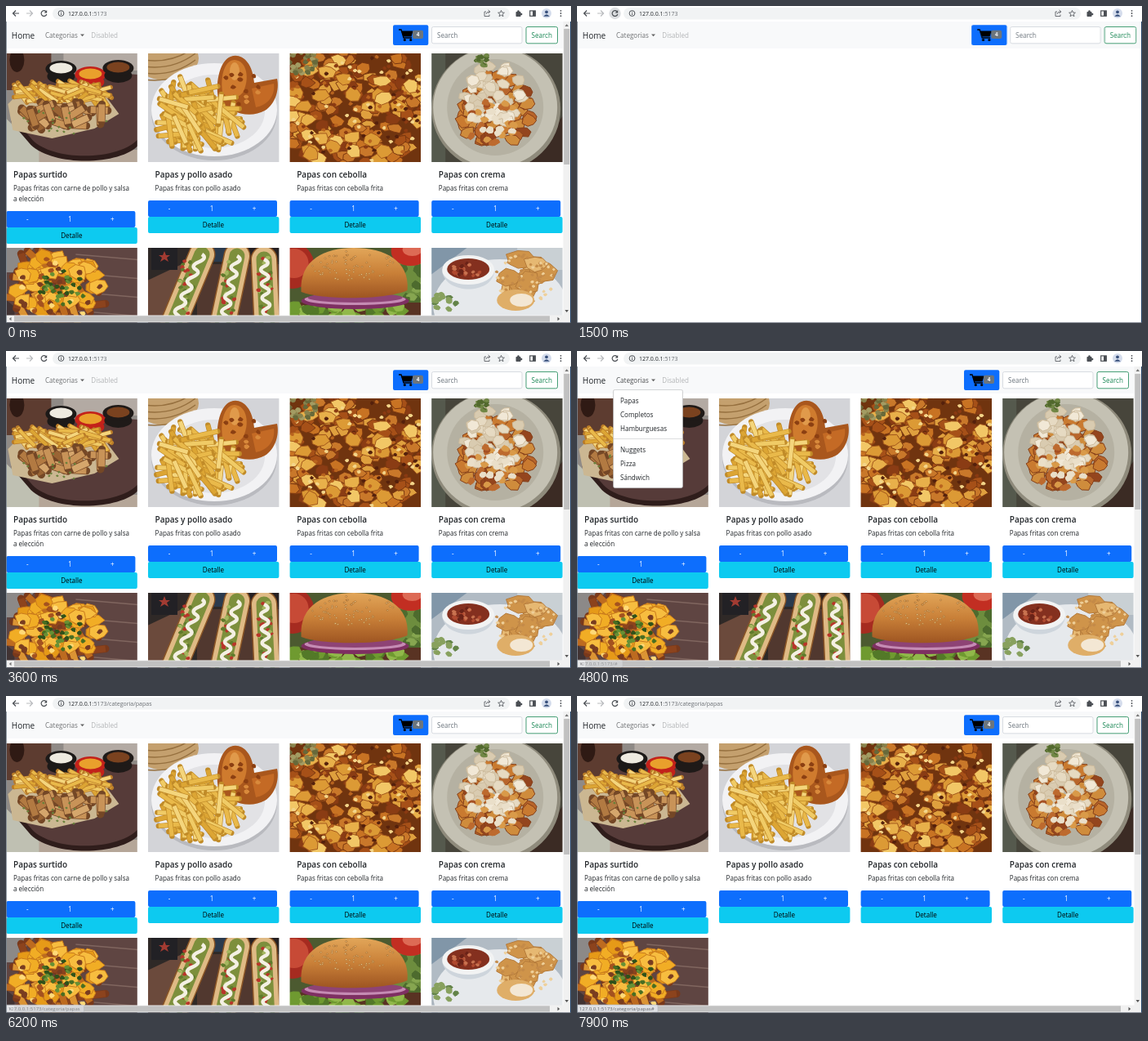
Animation, 692 px wide and 388 px high, one loop 8 s. Source, as an HTML page:

```html
<!DOCTYPE html>
<html lang="es">
<head>
<meta charset="utf-8">
<title>Papas</title>
<style>
  html, body { margin: 0; width: 100%; height: 100%; overflow: hidden; background: #fff; }
  svg { display: block; }
  text { font: 8.05px "Open Sans", "Noto Sans", sans-serif; fill: #212529; white-space: pre; }
  .title { font-size: 10px; font-weight: 600; }
  .brand { font-size: 10px; }
  .url { font-size: 7px; }
  .status { font-size: 6px; fill: #5f6368; }
  .mid { text-anchor: middle; }
  .white { fill: #fff; }
  .black { fill: #000; }
</style>
</head>
<body>
<script>
const LOOP = 8000;

// Drawing helpers
const rect = (x, y, w, h, fill, extra = '') =>
  `<rect x="${x}" y="${y}" width="${w}" height="${h}" fill="${fill}" ${extra}/>`;
const oval = (x, y, rx, ry, fill, extra = '') =>
  `<ellipse cx="${x}" cy="${y}" rx="${rx}" ry="${ry}" fill="${fill}" ${extra}/>`;
const path = (d, fill, extra = '') => `<path d="${d}" fill="${fill}" ${extra}/>`;
const line = (d, color, w = 1, extra = '') =>
  path(d, 'none', `stroke="${color}" stroke-width="${w}" ${extra}`);
const text = (x, y, str, cls = '', extra = '') =>
  `<text x="${x}" y="${y}" class="${cls}" ${extra}>${str}</text>`;
const group = (id, ...parts) => `<g id="${id}">${parts.join('')}</g>`;

const random = seed => () => (seed = seed * 16807 % 2147483647) / 2147483647;

// Spread n small shapes over an ellipse
function scatter(seed, n, [cx, cy, rx, ry], colors, shape) {
  const r = random(seed * 7919);
  let out = '';
  for (let i = 0; i < n; i++) {
    const a = r() * 6.283, d = Math.sqrt(r());
    const x = cx + Math.cos(a) * d * rx, y = cy + Math.sin(a) * d * ry;
    out += shape(x, y, colors[Math.floor(r() * colors.length)], r);
  }
  return out;
}
// Sticks lie within `spread` radians of the angle `turn`
const stick = (len, w, edge, turn = 0, spread = 3.14) => (x, y, color, r) => {
  const a = turn + (r() - 0.5) * spread, dx = Math.cos(a) * len / 2, dy = Math.sin(a) * len / 2;
  const d = `M${x - dx} ${y - dy}L${x + dx} ${y + dy}`;
  return line(d, edge, w + 1.4, 'stroke-linecap="round"') + line(d, color, w);
};
const lump = (size, edge) => (x, y, color, r) => {
  const pts = [];
  for (let i = 0; i < 7; i++) {
    const a = i * 0.898, d = size * (0.65 + r() * 0.5);
    pts.push(`${x + Math.cos(a) * d} ${y + Math.sin(a) * d * 0.8}`);
  }
  return path(`M${pts.join('L')}Z`, color,
    `stroke-linejoin="round" stroke="${edge || color}" stroke-width="1"`);
};

const fries = ['#e9b94a', '#f0cb66', '#dca534', '#f4d57c'];
const backdrop = color => rect(-5, -5, 171, 143, color);

const foods = [
  // Mixed platter
  () => backdrop('#8f8a86') + rect(-5, -5, 60, 50, '#5d3c30') + rect(70, -5, 95, 26, '#b3aaa3') +
    oval(13, 8, 9, 15, '#2f1a14') + path('M-5 75L60 140H-5Z', '#bfc0b2') +
    path('M40 118L166 118V140H40Z', '#b5a698') +
    path('M6 84C10 30 70 22 162 28V112C142 136 60 140 30 112Z', '#2f1d1b') +
    path('M8 78C12 28 70 20 162 26V104C142 130 60 134 32 106Z', '#563b39') +
    [[67, 19, '#eeeae0', '#1c1918'], [103, 26, '#e9a02c', '#c3211a'], [137, 18, '#7a421f', '#1f1a18']]
      .map(([x, y, sauce, cup]) => oval(x, y + 9, 17, 9, cup) + oval(x, y, 19, 10, cup) +
        oval(x, y - 1, 14, 6.5, sauce)).join('') +
    path('M2 62L20 44L120 50L138 74L108 92L56 104L8 94Z', '#cbb792') +
    scatter(3, 64, [70, 49, 56, 10], fries, stick(27, 4, '#b97b28', .15, 1.7)) +
    scatter(8, 30, [72, 76, 48, 14], ['#b27a42', '#c89358', '#9a6434', '#d5a66c'], stick(21, 8, '#744726', .5, 2.2)) +
    scatter(4, 20, [70, 82, 55, 18], ['#68823b'], lump(1.3)),

  // Chips and roast chicken
  () => backdrop('#d3d4d8') + oval(22, 6, 40, 27, '#c4a06e') +
    [8, 16, 24, 32].map(y => line(`M-5 ${y}Q30 ${y + 5} 58 ${y - 16}`, '#96703f', 1.5)).join('') +
    oval(81, 73, 77, 58, '#b9babf') + oval(81, 69, 77, 57, '#f2f2f4') + oval(81, 71, 62, 45, '#e2e2e5') +
    path('M86 54C82 34 89 8 101 4C113 -1 128 9 130 36L158 31C161 44 156 62 143 70C125 80 99 74 86 54Z', '#a9571d') +
    path('M91 47C88 25 95 8 106 8C121 9 125 31 116 48C108 57 97 57 91 47Z', '#cf7b2e') +
    path('M127 43L154 37C156 50 148 63 132 66Z', '#c46a25') + oval(106, 22, 6, 11, '#e09a4b') +
    scatter(22, 14, [114, 45, 26, 22], ['#8b3f12', '#d98a3c'], lump(3)) +
    scatter(11, 90, [60, 76, 46, 33], fries, stick(36, 5, '#c18b28', .8, 2.1)),

  // Potatoes with onion
  () => backdrop('#70340f') +
    scatter(5, 150, [80, 68, 95, 78], ['#c9782a', '#a65018', '#dfa03e', '#8a3c14', '#c87323'], lump(9, '#7a3710')) +
    scatter(9, 36, [80, 70, 86, 68], ['#e8b04a', '#f2c766', '#dc9a35'], lump(11, '#a3571b')) +
    scatter(14, 110, [80, 68, 90, 74], ['#54200c', '#8a3a12', '#f4d68a', '#b9641f'], lump(2.4)) +
    scatter(6, 50, [12, 6, 26, 19], ['#87824d', '#a39c63', '#67693a'], lump(3.6)),

  // Potatoes with cream
  () => backdrop('#47453b') + rect(-5, -5, 22, 143, '#55594d') + path('M166 70V140H112Z', '#3b2b24') +
    oval(79, 68, 79, 76, '#8f8b7c') + oval(78, 66, 76, 73, '#c4c1b3') + oval(78, 66, 59, 59, '#b5b1a2') +
    scatter(2, 70, [79, 70, 44, 44], ['#b8652b', '#cf8c3c', '#94451e', '#c97a30'], lump(10, '#853f19')) +
    scatter(7, 48, [76, 52, 37, 40], ['#e6dac2', '#f1e8d6', '#d9cbb0'], lump(8, '#cdbb9c')) +
    scatter(10, 24, [78, 86, 42, 30], ['#bd6a2e', '#d99a49', '#a54f22'], lump(5)) +
    scatter(19, 12, [76, 84, 30, 18], ['#eadfc9'], lump(5)) +
    scatter(3, 14, [62, 8, 10, 7], ['#52692d', '#718745'], lump(3)),

  // Loaded fries
  () => backdrop('#5f4542') +
    [8, 31, 54, 77].map(y => line(`M85 ${y}L166 ${y + 7}`, '#80665f', 1.4)).join('') +
    path('M-5 -5H38L8 30H-5Z', '#8c8988') + path('M-5 60L10 72V140H-5Z', '#413333') +
    scatter(4, 44, [58, 54, 62, 46], ['#bd6b20', '#db9434', '#8c431d'], stick(34, 8, '#79391b', .8, 2)) +
    scatter(12, 46, [62, 44, 52, 36], ['#f1ad25', '#f7bd3f', '#e69a18'], lump(12, '#c97a1c')) +
    scatter(5, 40, [64, 50, 55, 38], ['#793c20', '#a4521f', '#ffda78'], lump(3.5)) +
    scatter(21, 34, [70, 48, 30, 22], ['#486e22', '#669035', '#2f521a'], lump(3)),

  // Hot dogs
  () => backdrop('#2f2927') + path('M60 20H166V140H60Z', '#51382f') +
    path('M-5 42L50 16V140H-5Z', '#6b4a3c') + rect(4, -5, 32, 32, '#222125') +
    path('M20 4L22 9L27 9L23 12L25 17L20 14L15 17L17 12L13 9L18 9Z', '#a23b32') +
    rect(76, -5, 26, 22, '#2b3a4d') + rect(124, -5, 42, 22, '#262022') +
    [[66, 8, 28, 100], [109, 10, 90, 100], [142, 14, 146, 100]].map(([x, y, x2, y2], i) => {
      const d = `M${x} ${y}L${x2} ${y2}`, round = 'stroke-linecap="round"';
      let mayo = `M${x} ${y}`;
      for (let k = 1; k < 11; k++)
        mayo += `Q${x + (x2 - x) * (k - .5) / 10 + (k % 2 ? 9 : -9)} ${y + (y2 - y) * (k - .5) / 10} ` +
          `${x + (x2 - x) * k / 10} ${y + (y2 - y) * k / 10}`;
      return line(d, '#8a5526', 33, round) + line(d, '#dfba85', 30, round) + line(d, '#7d8f3c', 19, round) +
        scatter(i + 4, 26, [(x + x2) / 2, 46, 9, 38], ['#b9352a', '#a5b75f', '#5f7a2c'], lump(2.6)) +
        line(mayo, '#f4f0e3', 4.5, 'stroke-linejoin="round"');
    }).join(''),

  // Burger
  () => backdrop('#4c5a30') + oval(4, 22, 26, 28, '#a62b20') + oval(5, 19, 18, 18, '#c74a36') +
    oval(148, 38, 30, 34, '#6d8d3e') + scatter(15, 22, [146, 42, 20, 26], ['#86a650', '#4d6b2e'], lump(7)) +
    oval(148, 4, 24, 18, '#c22e22') + oval(150, 2, 12, 8, '#dd6a55') +
    rect(-5, 67, 171, 70, '#593323') +
    scatter(6, 34, [78, 76, 78, 12], ['#6f9a30', '#91b84a', '#537928'], lump(9)) +
    oval(80, 65, 66, 10, '#7e2f62') + oval(80, 63, 62, 7, '#c58bb4') + oval(80, 61, 58, 6, '#8e4375') +
    path('M14 54C11 14 44 0 78 0C117 0 147 16 144 52C118 64 40 64 14 54Z', 'url(#bun)') +
    scatter(17, 70, [78, 22, 52, 18], ['#f3dfac', '#e9cc91'], lump(1.3, '#b67836')),

  // Nuggets
  () => backdrop('#b1bbc4') + path('M-5 -5H50L-5 36Z', '#8196a8') + rect(105, -5, 61, 32, '#c9d0d4') +
    oval(84, 74, 84, 59, '#a9b3bc') + oval(84, 71, 82, 57, '#e6e9ec') +
    path('M13 28H77C75 58 16 58 13 28Z', '#ced5dc') + oval(45, 27, 32, 18, '#f2f3f3') + oval(45, 26, 26, 13, '#84301f') +
    scatter(5, 26, [45, 26, 21, 9], ['#b04a30', '#6a2318', '#c97350'], lump(2.4)) +
    scatter(13, 13, [116, 38, 32, 25], ['#dba65c', '#e6b872', '#cf944a'], lump(17, '#b47a3a')) +
    scatter(18, 70, [115, 40, 40, 32], ['#efd09a', '#c48a48'], lump(1.8)) +
    oval(103, 64, 23, 13, '#dfae68') + oval(110, 64, 14, 8, '#f3e7d4') +
    scatter(9, 14, [16, 66, 15, 10], ['#628348', '#88a15e'], lump(4))
];

const colX = i => i * 173.6 + 0.4;
const photo = (i, y) =>
  `<svg x="${colX(i % 4)}" y="${y}" width="160.4" height="133"><g filter="url(#soft)">${foods[i]()}</g></svg>`;

function card(i, title, lines) {
  const x = colX(i), y = lines.length > 1 ? 251 : 238;
  const mark = (dx, s) => text(x + dx, y + 13, s, 'mid white');
  return photo(i, 58) + text(x + 8.6, 210, title, 'title') +
    lines.map((s, k) => text(x + 8.6, 226 + k * 13, s)).join('') +
    rect(x, y, 158, 20, '#0d6efd', 'rx="2"') + mark(26, '-') + mark(78, '1') + mark(130, '+') +
    rect(x, y + 20, 160.4, 20, '#0dcaf0', 'rx="2"') + text(x + 80, y + 33, 'Detalle', 'mid black');
}

const toolbar = () => {
  const dark = '#4b4f54';
  return rect(0, 0, 692, 19, '#fff') + rect(57, 2, 560, 14.5, '#f1f3f4', 'rx="7.25"') +
    line('M16 9H8.5M12 5.5L8.5 9L12 12.5', dark, 1.2) +
    line('M25 9H32.5M29 5.5L32.5 9L29 12.5', '#b9bbbe', 1.2) +
    `<circle id="reloadHover" cx="46.5" cy="9" r="7.2" fill="#dcdee1"/>` +
    line('M49 6.7A3.4 3.4 0 1 0 49.8 10', dark, 1.2) + path('M50.2 5V8.6H46.6Z', dark) +
    `<circle cx="67.5" cy="9" r="3.4" fill="none" stroke="${dark}"/>` + line('M67.5 8.5V11M67.5 6.8V7.7', dark, .9) +
    text(76, 11.6, '127.0.0.1<tspan fill="#6b6f74">:5173<tspan id="route">/categoria/papas</tspan></tspan>', 'url') +
    line('M588 7H586V12.5H592V10.5M588 10Q588.5 7 592 7M590.5 5L593 7L590.5 9', '#5f6368', .9) +
    line('M606.5 5.3L607.6 8L610.4 8.2L608.2 10L609 12.7L606.5 11.2L604 12.7L604.8 10L602.6 8.2L605.4 8Z', '#5f6368', .9) +
    rect(624.5, 7, 6, 6, dark, 'rx=".8"') + oval(627.5, 6.6, 1.3, 1.4, dark) + oval(631, 10, 1.4, 1.3, dark) +
    rect(641.7, 5.9, 6.6, 6.4, 'none', `stroke="${dark}" stroke-width="1.2"`) + rect(645, 6, 3.4, 6, dark) +
    oval(662, 9, 6, 6, '#d4dcec') + oval(662, 7.3, 1.9, 1.9, '#38507c') + path('M658.3 12.8Q662 7.8 665.7 12.8Z', '#38507c') +
    [5.8, 9, 12.2].map(y => oval(679.5, y, .9, .9, dark)).join('');
};

const navbar = () =>
  rect(0, 19, 692, 33, '#f8f9fa') + text(6.8, 40, 'Home', 'brand') +
  text(48, 39, 'Categorias', '', 'id="category" style="fill:#707274"') + path('M91 34.5H96L93.5 37.2Z', '#666') +
  text(104.3, 39, 'Disabled', '', 'style="fill:#b3b5b7"') +
  group('tools',
    rect(474, 23.3, 43.3, 24.7, '#0d6efd', 'rx="2"'),
    line('M481 29H484L487 39H497', '#000', 1.3), path('M484.2 30.5H498.5L496.5 37.5H486.5Z', '#000'),
    oval(488.3, 41.5, 1.6, 1.6, '#000'), oval(495.7, 41.5, 1.6, 1.6, '#000'),
    rect(498, 29.8, 13, 10.2, '#6c757d', 'rx="2"'), text(504.5, 37.3, '4', 'mid white', 'style="font-size:6.3px;font-weight:700"'),
    rect(521.5, 25.5, 110.5, 20.3, '#fff', 'rx="2" stroke="#ced4da" stroke-width=".8"'),
    text(528, 39, 'Search', '', 'style="fill:#6c757d"'),
    rect(637, 25.5, 38.5, 20.3, '#fff', 'rx="2" stroke="#198754" stroke-width=".8"'),
    text(656.2, 39, 'Search', 'mid', 'style="fill:#198754"'));

const scrollbars = () =>
  rect(682.5, 19, 8.5, 360, '#f1f1f1') + rect(683.2, 28, 7, 166, '#c1c1c1') +
  path('M684.5 25L686.8 22L689 25Z', '#777') + path('M684.5 372L686.8 375L689 372Z', '#555') +
  rect(0, 378.5, 691, 8.8, '#f1f1f1') + rect(10, 379.3, 656, 7.2, '#c1c1c1') +
  path('M6.5 380.7V385.2L3.8 383Z', '#777') + path('M675.5 380.7V385.2L678.2 383Z', '#555');

const menu = () =>
  rect(43.8, 47.6, 86, 121, '#000', 'rx="2.5" opacity=".1"') +
  rect(44.6, 47.4, 84.8, 120.2, '#fff', 'rx="2" stroke="#c6c7c8" stroke-width=".8"') +
  rect(45, 52.2, 84, 17, '#e9ecef', 'id="menuHover"') + line('M45 107.5H129', '#d5d6d7', .8) +
  ['Papas', 'Completos', 'Hamburguesas', 'Nuggets', 'Pizza', 'Sándwich']
    .map((s, i) => text(53, 64 + i * 17 + (i > 2 ? 9 : 0), s)).join('');

const status = (id, str, width) => group(id,
  path(`M0 378H${width - 2}Q${width} 378 ${width} 380V387H0Z`, '#dfe1e5', 'stroke="#b8bbc0" stroke-width=".7"'),
  text(2.8, 384.8, '127.0.0.1:5173/' + str, 'status'));

document.body.innerHTML = `<svg width="692" height="388" viewBox="0 0 692 388">
  <defs>
    <filter id="soft" x="0" y="0" width="1" height="1"><feGaussianBlur stdDeviation=".7"/></filter>
    <linearGradient id="bun" x2="0" y2="1"><stop stop-color="#e2a659"/><stop offset=".5" stop-color="#c98038"/>
      <stop offset="1" stop-color="#9e5522"/></linearGradient>
  </defs>` +
  rect(0, 0, 692, 388, '#fff') + toolbar() + navbar() +
  group('content',
    card(0, 'Papas surtido', ['Papas fritas con carne de pollo y salsa', 'a elección']),
    card(1, 'Papas y pollo asado', ['Papas fritas con pollo asado']),
    card(2, 'Papas con cebolla', ['Papas fritas con cebolla frita']),
    card(3, 'Papas con crema', ['Papas fritas con crema']),
    photo(4, 296), group('others', photo(5, 296), photo(6, 296), photo(7, 296)),
    scrollbars()) +
  group('menu', menu()) +
  status('statusHash', '#', 56) + status('statusPapas', 'categoria/papas', 95.5) +
  status('statusEnd', 'categoria/papas#', 99) +
  line('M.4 19V388', '#66737f', .8) + line('M691.5 19V388', '#274569') + line('M0 387.6H692', '#5c6470', .8) +
  '</svg>';

// Hard steps: [time in ms, value]
function play(id, prop, steps) {
  const frames = steps.map(([t, v]) => ({ offset: t / LOOP, [prop]: v, easing: 'step-end' }));
  frames.push({ offset: 1, [prop]: steps.at(-1)[1] });
  document.getElementById(id).animate(frames, { duration: LOOP, iterations: Infinity });
}
const fade = (id, ...steps) => play(id, 'opacity', steps);

fade('reloadHover', [0, 0], [1000, .5], [1100, 1], [1900, 0]);
fade('content', [0, 1], [1500, 0], [3600, 1]);
play('tools', 'transform', [[0, 'none'], [1500, 'translateX(9.2px)'], [3600, 'none']]);
play('category', 'fill', [[0, '#707274'], [4600, '#4d4f51'], [5500, '#707274'], [7700, '#4d4f51'], [7900, '#707274']]);
fade('menu', [0, 0], [4800, 1], [5800, 0]);
fade('menuHover', [0, 0], [5500, 1]);
fade('statusHash', [0, 0], [4800, .5], [4900, 1], [5500, 0]);
fade('statusPapas', [0, 0], [5500, 1], [6200, .66], [6300, .33], [6400, 0]);
play('route', 'fillOpacity', [[0, 0], [5800, 1]]);
fade('others', [0, 1], [7800, 0]);
fade('statusEnd', [0, 0], [7700, .5], [7800, 1]);
</script>
</body>
</html>
```
